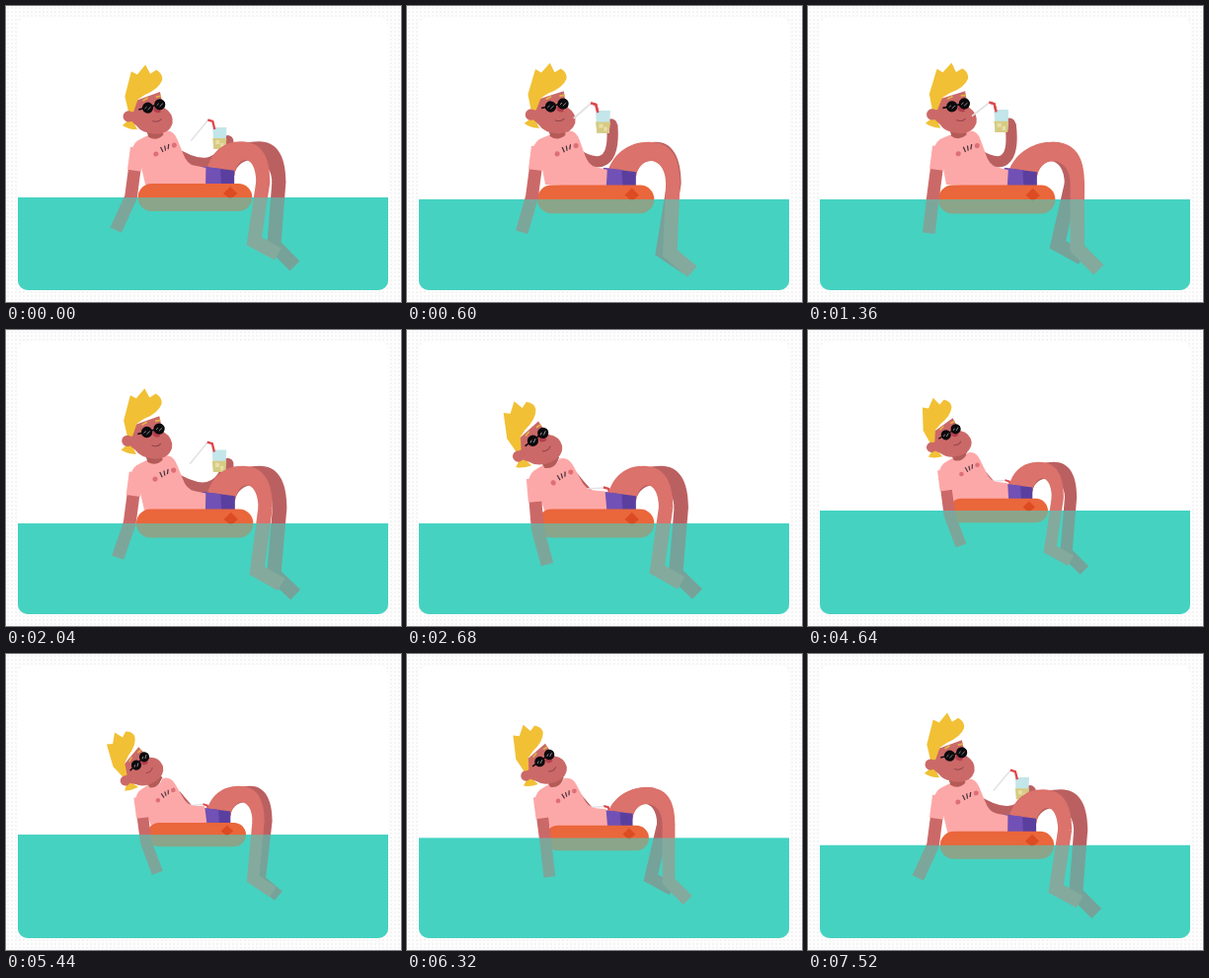
An HTML page with a canvas for the animation above (7560 ms loop, 400 by 300 pixels).

```html
<!DOCTYPE html>
<html lang="en">
<head>
<meta charset="utf-8">
<title>Floating with a drink</title>
<style>
html, body { margin: 0; width: 100%; height: 100%; overflow: hidden; }
body { background: #fdfdfd radial-gradient(#f4f4f4 .8px, #fdfdfd 1px) 0 0 / 4px 4px; }
canvas { display: block; }
</style>
</head>
<body>
<canvas id="stage" width="400" height="300"></canvas>
<script>
const c = document.getElementById('stage').getContext('2d');
const LOOP = 7560, KICK = LOOP / 3;
const SKIN = '#cb6968', NEAR = '#db726b', FAR = '#bb6061', PINK = '#fda8a8',
      HAIR = '#f1c035', WATER = '#46d2c1', INK = '#0c0a0d';

const smooth = u => u * u * (3 - 2 * u);
const ramp = (t, a, b) => smooth(Math.min(1, Math.max(0, (t - a) / (b - a))));
const bend = (u, a, b, d) => (1 - u) * (1 - u) * a + 2 * u * (1 - u) * b + u * u * d;
const wave = (t, shift) => Math.cos((t / KICK + shift) * 2 * Math.PI);

// Rises from a to b and falls from d to e; may run over the end of the loop
function pulse(t, a, b, d, e) {
  const at = x => ramp(x, a, b) - ramp(x, d, e);
  return at(t) + at(t + LOOP);
}

function poseAt(t) {
  const away = pulse(t, 2800, 3300, 5300, 8300);
  const relax = pulse(t, 2100, 2900, 6300, 7400);
  const sip = pulse(t, 6700, 8360, 9210, 10060);
  const nod = wave(t, -.23), swing = wave(t, 0), side = 2 * relax - 1;
  return {
    level: 196 - 13 * away,
    scale: 1.03 - .16 * away,
    stretch: 1 + .06 * away,
    lean: relax * (.09 + .04 * nod) - .06 * sip * sip,
    nod: relax * (.29 + .11 * nod),
    upper: .13 * side,
    fore: (.27 + .16 * swing) * side,
    kick: smooth(.5 - .5 * wave(t, .05)),
    sip,
    glass: {
      x: bend(sip, 211, 230, 196),
      y: bend(sip, 177, 125, 117),
      tip: bend(sip, -17, 16, -5)
    }
  };
}

function fill(path, color) {
  c.fillStyle = color;
  c.fill(new Path2D(path));
}

function line(path, color, width) {
  c.strokeStyle = color;
  c.lineWidth = width;
  c.stroke(new Path2D(path));
}

function disc(x, y, r, color) {
  c.fillStyle = color;
  c.beginPath();
  c.arc(x, y, r, 0, 7);
  c.fill();
}

// Draws with the stage turned (and scaled) about a point
function turned(x, y, angle, scale, part) {
  c.save();
  c.translate(x, y);
  c.rotate(-angle);
  c.scale(scale, scale);
  c.translate(-x, -y);
  part();
  c.restore();
}

function leg(q, shift, color) {
  const k = 260 + 11 * q + shift, r = k + 7, l = k - 7;
  const top = 238 + 8 * q + 2 * shift, dip = 28 * q * (1 - q);
  fill(`M202 172C206 150 ${top - 20} 137.5 ${top} 137.5C${k - 2} 137.5 ${r} 152 ${r} 179
    H${l}C${l} 150 234 150 231 172Z`, color);
  line(`M${k} 178L${251 + 20 * q} ${238 + 4 * q + dip}
    L${275 + 17 * q} ${251 + 12 * q + dip}`, color, 14);
}

function glass({ x, y, tip }) {
  c.save();
  c.translate(x, y);
  fill('M-7-11H7L6 11H-6Z', '#c3e6ea');
  fill('M-7 0H7L6 11H-6Z', '#d6cb83');
  fill('M-4 2h4v4h-4zM1 5h3v4h-3z', '#e8dfa6');
  line(`M-12-18L-29 ${tip}`, '#e3e3e6', 1.6);
  line('M-5-9L-7-17L-12-18.5', '#e0474c', 2.3);
  c.restore();
}

function drinkArm({ x, y }) {
  const dip = 176 + Math.max(0, y - 145) * .8;
  line(`M168 147Q212 ${dip} ${x + 9} ${y + 3}`, FAR, 11);
  if (y < 150) disc(x + 8, y + 3, 6, FAR);
}

function head() {
  fill('M142 122H158L159 132Q152 139 144 134Z', '#b45b57');
  fill('M118 123L127 115L133 127Q124 127 118 123Z', HAIR);
  fill('M126 100L155 89Q158 103 160 105Q169 110 168 120Q165 131 151 131Q138 131 132 123L126 118Z', SKIN);
  fill('M120 94L126 69L132 72L140 62L145 71L151 67Q158 71 157 77Q154 86 140 92L133 97L129 109L124 110Z', HAIR);
  disc(124, 114, 5.5, SKIN);
  fill('M149 102L154 99L156 109Q152 111 149 108Z', '#b43f4d');
  line('M138 98L143 95M151 94L156 93', '#e0b540', 1.6);
  line('M134 107L160 100', INK, 1.5);
  for (const [x, y] of [[143, 105], [155, 101.5]]) {
    disc(x, y, 5.5, INK);
    line(`M${x - 3} ${y + 1}l2-2M${x} ${y + 2}l3-3`, '#b9b9bd', .7);
  }
  line('M148 118Q154 120 157 116', '#92434a', 1);
}

function torso() {
  fill('M127 150Q129 139 137 136L145 132Q153 140 160 128Q169 126 173 136L179 150Q183 161 191 162L202 164V182H142L137 162Z', PINK);
  fill('M143 131Q153 138 160 127L158 124H143Z', '#b45b57');
  disc(152, 151, 2.5, '#dd6f76');
  disc(170, 142, 2.5, '#dd6f76');
  for (const i of [-1, 0, 1]) line(`M${160.5 + 4 * i} ${142.5 - 1.5 * i}l${1 - 1.5 * i} 5`, '#47313b', 1.2);
}

function restingArm(upper, fore) {
  const along = (x, y, angle, length) => [x + length * Math.sin(angle), y + length * Math.cos(angle)];
  const shoulder = [133, 148];
  const elbow = along(...shoulder, upper, 47);
  line(`M${shoulder}L${elbow}L${along(...elbow, fore, 36)}`, SKIN, 12.5);
  line(`M${along(...shoulder, upper, -3)}L${along(...shoulder, upper, 20)}`, PINK, 14);
}

function swimmer(p) {
  const body = part => turned(185, 178, p.lean, p.stretch, part);
  c.save();
  c.translate(191.5 + (1 - p.scale) * 11, p.level);
  c.scale(p.scale, p.scale);
  c.translate(-191.5, -194);

  drinkArm(p.glass);
  glass(p.glass);
  leg(1 - p.kick, 5, FAR);
  leg(p.kick, 0, NEAR);
  fill('M199 163L231 167V182H199Z', '#5a3f9f');
  fill('M199 163L217 165L218 182H199Z', '#7151b5');
  body(() => {
    torso();
    turned(150, 132, p.nod, 1, head);
  });
  if (p.sip > .8) glass(p.glass);

  c.fillStyle = '#ea663b';
  c.beginPath();
  c.roundRect(134, 180, 115, 28, 14);
  c.fill();
  fill('M227 183l7 7l-7 6l-7-6z', '#dc4b22');

  // The arm hangs by its own angle, whatever the lean
  body(() => turned(133, 148, -p.lean, 1, () => restingArm(p.upper, p.fore)));
  c.restore();
}

function draw(t) {
  const pose = poseAt(t);
  c.clearRect(0, 0, 400, 300);
  c.save();
  c.beginPath();
  c.roundRect(12, 11, 375, 277, 10);
  c.clip();
  c.fillStyle = '#fff';
  c.fillRect(0, 0, 400, 300);
  c.fillStyle = WATER;
  c.fillRect(0, pose.level, 400, 300);
  swimmer(pose);
  c.globalAlpha = .58;
  c.fillStyle = WATER;
  c.fillRect(0, pose.level, 400, 300);
  c.restore();
}

const start = performance.now();
function tick() {
  draw((performance.now() - start) % LOOP);
  requestAnimationFrame(tick);
}
tick();
</script>
</body>
</html>
```
